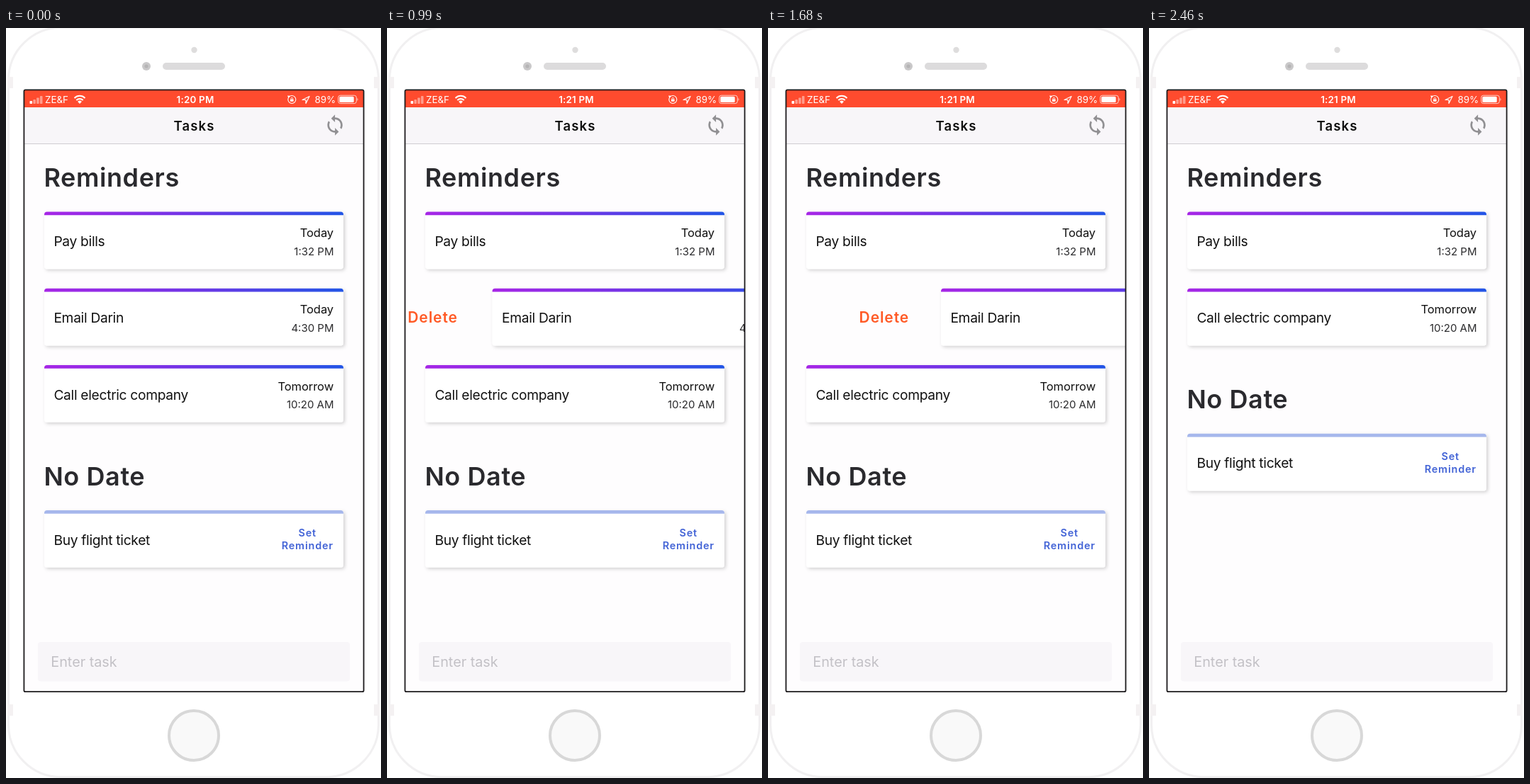
These frames come from a looping animation (529x1059 px, 2.52 s). An HTML page:

```html
<!DOCTYPE html>
<html lang="en">
<head>
<meta charset="utf-8">
<title>Tasks</title>
<style>
  html, body { margin: 0; width: 100%; height: 100%; overflow: hidden; background: #fff; }
  svg { display: block; width: 100%; height: 100%; }
  text { font-family: Inter, Roboto, "Liberation Sans", sans-serif; fill: #111; white-space: pre; }
  .status { font-size: 13.4px; fill: #fff; }
  .title { font-size: 18.5px; font-weight: 600; letter-spacing: 1.1px; }
  .heading { font-size: 36px; font-weight: 600; letter-spacing: .6px; fill: #2a2a2e; }
  .task { font-size: 19.2px; letter-spacing: -.3px; }
  .day { font-size: 16.5px; letter-spacing: -.05px; text-anchor: end; }
  .hour { font-size: 15px; fill: #2c2c2e; text-anchor: end; }
  .set { font-size: 14.4px; font-weight: 600; letter-spacing: .85px; fill: #4263d6; text-anchor: middle; }
  .delete { font-size: 21px; font-weight: 600; letter-spacing: .9px; fill: #ff5a26; }
  .hint { font-size: 19.8px; fill: #c3c1c6; }
  .mid { text-anchor: middle; }
</style>
</head>
<body>
<svg viewBox="0 0 529 1059" xmlns="http://www.w3.org/2000/svg">
  <defs>
    <linearGradient id="dated">
      <stop offset="0" stop-color="#a626e6"/>
      <stop offset=".5" stop-color="#6f35e6"/>
      <stop offset="1" stop-color="#2255e6"/>
    </linearGradient>
    <filter id="shadow" x="-5%" y="-20%" width="110%" height="150%">
      <feDropShadow dx="2" dy="2" stdDeviation="2.7" flood-color="#000" flood-opacity=".18"/>
    </filter>
    <clipPath id="screen"><rect x="26" y="88" width="478" height="849"/></clipPath>
  </defs>

  <!-- Phone body -->
  <rect x="3.5" y="-.5" width="522" height="1058" rx="74" fill="#fff" stroke="#f1f0f1" stroke-width="3"/>
  <g fill="#f4f1f2">
    <rect x="2" y="69" width="8" height="16"/>
    <rect x="519" y="69" width="8" height="16"/>
    <rect x="2" y="955" width="8" height="16"/>
    <rect x="519" y="955" width="8" height="16"/>
  </g>
  <circle cx="265.5" cy="31" r="4.2" fill="#dedddd"/>
  <circle cx="198" cy="54" r="6" fill="#c9c8c9"/>
  <circle cx="198" cy="54" r="2.6" fill="#b5b4b5"/>
  <rect x="221" y="49" width="88" height="10" rx="5" fill="#dcdbdc"/>
  <circle cx="265" cy="999" r="35" fill="#f9f9f9" stroke="#d8d8d8" stroke-width="4"/>

  <!-- Screen -->
  <rect x="25.4" y="87.4" width="479.2" height="849.8" rx="2" fill="#fefdfe"/>
  <g clip-path="url(#screen)">
    <g id="list"></g>
    <rect x="26" y="88" width="478" height="24" fill="#ff4b2e"/>
    <rect x="26" y="112" width="478" height="51" fill="#f8f6f9"/>
    <rect x="26" y="163" width="478" height="1" fill="#cfcdd1"/>
    <rect x="45" y="867" width="440" height="55.5" rx="4" fill="#f8f6f9"/>
    <text class="hint" x="63.3" y="902">Enter task</text>
  </g>
  <rect x="25.4" y="87.4" width="479.2" height="849.8" rx="2" fill="none" stroke="#1d1b1d" stroke-width="1.8"/>

  <!-- Status bar -->
  <g id="signal" fill="#fff"></g>
  <text class="status" x="55" y="106">ZE&amp;F</text>
  <path d="M96.5 99a10.5 10.5 0 0 1 15 0M99.3 102a6.6 6.6 0 0 1 9.4 0" fill="none" stroke="#fff" stroke-width="2"/>
  <path d="M104 107l-2.9-3a4.1 4.1 0 0 1 5.8 0z" fill="#fff"/>
  <text class="status mid" id="clock" x="267" y="106" font-weight="600" letter-spacing=".2"></text>
  <circle cx="403.3" cy="101" r="5.5" fill="none" stroke="#fff" stroke-width="1.1"/>
  <path d="M397 95.6l4 .2-2.6 3z" fill="#fff"/>
  <rect x="401" y="100.5" width="4.6" height="3.2" rx=".4" fill="#fff"/>
  <path d="M402 100.5v-.8a1.3 1.3 0 0 1 2.6 0v.8" fill="none" stroke="#fff" stroke-width=".9"/>
  <path d="M418 101.5l10-5-5 10v-5z" fill="none" stroke="#fff" stroke-width="1.2" stroke-linejoin="round"/>
  <text class="status" x="435.5" y="106">89%</text>
  <rect x="468.7" y="95.2" width="25.6" height="11.4" rx="3" fill="none" stroke="#fff" stroke-opacity=".75"/>
  <rect x="470.3" y="96.8" width="20.4" height="8.2" rx="1.6" fill="#fff"/>
  <path d="M495.5 98.8q2 2.1 0 4.2z" fill="#fff" fill-opacity=".75"/>

  <!-- Header -->
  <text class="title mid" x="265.5" y="144.5">Tasks</text>
  <path transform="translate(448 121) scale(1.34)" fill="#919093"
    d="M12 4V1L8 5l4 4V6c3.3 0 6 2.7 6 6 0 1-.25 2-.7 2.8l1.46 1.46C19.54 15 20 13.6 20 12c0-4.4-3.6-8-8-8zm0 14c-3.3 0-6-2.7-6-6 0-1 .25-2 .7-2.8L5.24 7.74C4.46 9 4 10.4 4 12c0 4.4 3.6 8 8 8v3l4-4-4-4z"/>
</svg>

<script>
const LOOP = 2520, STEP = 30;
const ROW = 108.2;
const $ = id => document.getElementById(id);

const label = (cls, x, y, str) => `<text class="${cls}" x="${x}" y="${y}">${str}</text>`;

// A card with its top left corner at (54, y)
function card(y, color, name, side) {
  return `<g transform="translate(54 ${y})">
    <rect width="422" height="80.8" rx="4" fill="#fff" filter="url(#shadow)"/>
    <path d="M0 4.8V4a4 4 0 0 1 4-4H418a4 4 0 0 1 4 4v.8z" fill="${color}"/>
    ${label("task", 13.4, 48.7, name)}${side}</g>`;
}
const due = (day, hour) => label("day", 408.1, 35.8, day) + label("hour", 408.5, 61.2, hour);
const dated = (row, name, day, hour) =>
  card(259.5 + row * ROW, "url(#dated)", name, due(day, hour));

$("list").innerHTML =
  label("heading", 53.4, 224, "Reminders") +
  dated(0, "Pay bills", "Today", "1:32 PM") +
  `<g id="swipe">${dated(1, "Email Darin", "Today", "4:30 PM")}</g>` +
  `<g id="remove">${label("delete", 0, 416, "Delete")}</g>` +
  `<g id="below">` +
  dated(2, "Call electric company", "Tomorrow", "10:20 AM") +
  label("heading", 53.4, 645.5, "No Date") +
  card(680.9, "#a6b7ec", "Buy flight ticket",
    label("set", 371.3, 37.4, "Set") + label("set", 371.3, 55, "Reminder")) +
  `</g>`;

$("signal").innerHTML = [4, 6, 8.5, 11].map((h, i) =>
  `<rect x="${33.5 + i * 4.8}" y="${107 - h}" width="3.6" height="${h}" rx=".8" opacity="${i ? .45 : 1}"/>`).join("");

const clamp = v => Math.max(0, Math.min(1, v));
const progress = (t, from, to) => clamp((t - from) / (to - from));
const easeInOut = u => (1 - Math.cos(Math.PI * u)) / 2;

// Finger drag that slows down, then the card flies off after release
function swipeOffset(t) {
  if (t < 810) return 0;
  const drag = 11.5 + 178.5 * (1 - Math.pow(1 - progress(t, 810, 1680), 2.7));
  return drag + 410 * easeInOut(progress(t, 1680, 1980));
}

const move = (id, x, y) => $(id).setAttribute("transform", `translate(${x.toFixed(2)} ${y.toFixed(2)})`);
const show = (id, on) => $(id).setAttribute("visibility", on ? "visible" : "hidden");

function draw(ms) {
  const t = Math.floor((ms % LOOP) / STEP) * STEP;
  const x = swipeOffset(t);
  const gone = t >= 1980;
  $("clock").textContent = t < 180 ? "1:20 PM" : "1:21 PM";
  move("swipe", x, 0);
  move("remove", 90.6 + (x - 153.5) * 1.04, 0);
  show("swipe", !gone);
  show("remove", x > 0 && !gone);
  move("below", 0, t < 2220 ? 0 : -ROW * easeInOut(progress(t, 2175, 2460)));
}

const start = performance.now();
function tick() {
  draw(performance.now() - start);
  requestAnimationFrame(tick);
}
draw(0);
requestAnimationFrame(tick);
</script>
</body>
</html>
```
